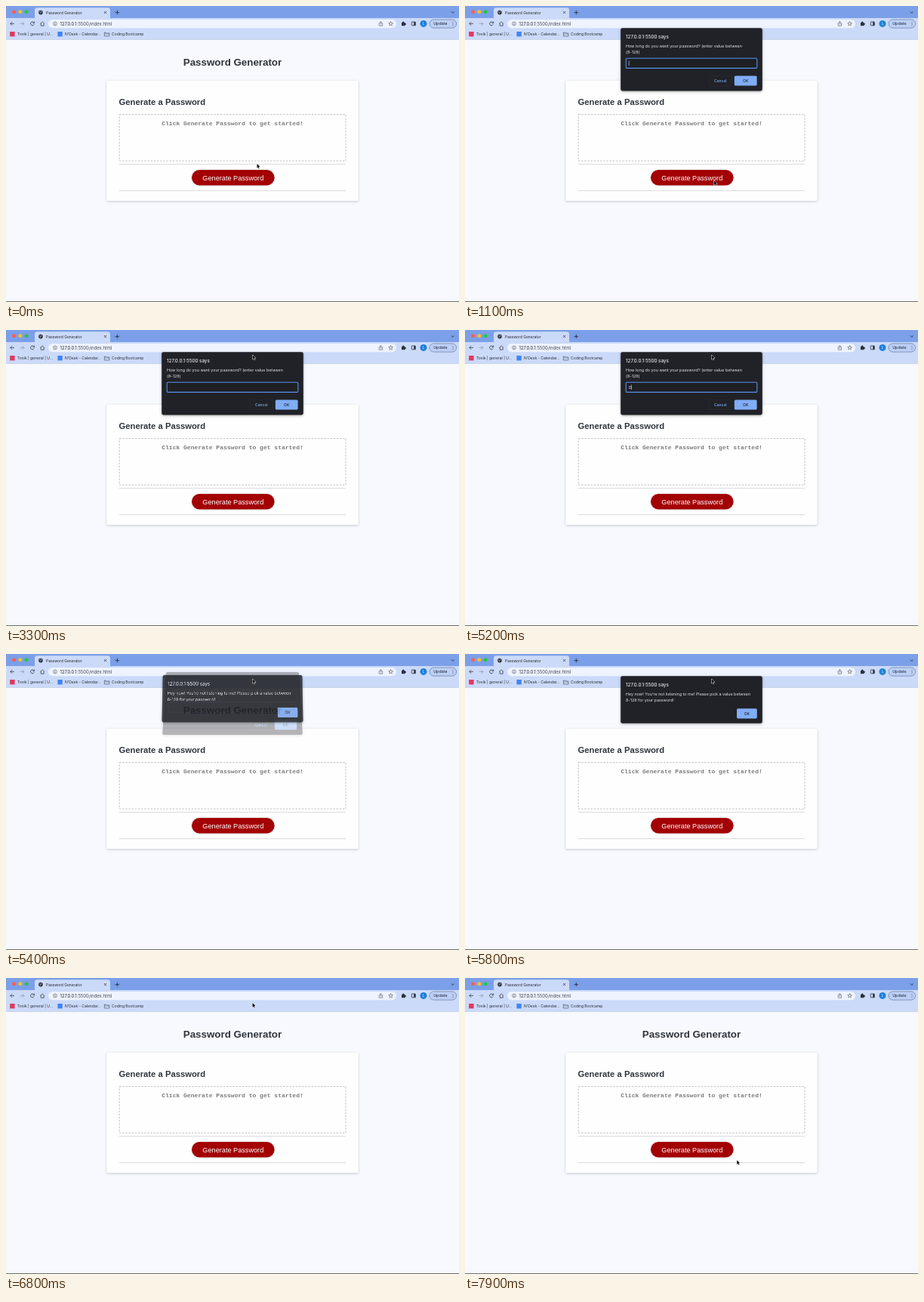
Animation of 600 by 392 pixels, one loop 8000 ms. Source, as an HTML page with a canvas:

```html
<!DOCTYPE html>
<html lang="en">
<head>
<meta charset="utf-8">
<title>Password Generator</title>
<style>
html, body { margin: 0; width: 100%; height: 100%; overflow: hidden; background: #f7f9fe; }
canvas { display: block; width: 600px; height: 392px; }
</style>
</head>
<body>
<canvas id="stage"></canvas>
<script>
const W = 600, H = 392, LOOP = 8000, STEP = 100;
const UI = 'Inter, "Noto Sans", sans-serif';
const SANS = '"Liberation Sans", Arial, sans-serif';
const MONO = '"Liberation Mono", "Courier New", monospace';
const INK = '#2f343c';
const dpr = window.devicePixelRatio || 1;
const K = 2 * dpr;

function makeCanvas(el, w, h, scale) {
  el.width = w * scale;
  el.height = h * scale;
  const c = el.getContext('2d');
  c.scale(scale, scale);
  return c;
}

const main = makeCanvas(document.getElementById('stage'), W, H, dpr);
const layerEl = document.createElement('canvas');
const layer = makeCanvas(layerEl, W, 130, K);
let g = main;

// ---- drawing helpers ----
function rect(x, y, w, h, fill) {
  g.fillStyle = fill;
  g.fillRect(x, y, w, h);
}

function roundPath(x, y, w, h, r) {
  g.beginPath();
  g.roundRect(x, y, w, h, r);
}

function box(x, y, w, h, r, fill) {
  roundPath(x, y, w, h, r);
  g.fillStyle = fill;
  g.fill();
}

function frame(x, y, w, h, r, color, width) {
  roundPath(x, y, w, h, r);
  g.strokeStyle = color;
  g.lineWidth = width;
  g.stroke();
}

function dot(x, y, r, fill) {
  g.beginPath();
  g.arc(x, y, r, 0, Math.PI * 2);
  g.fillStyle = fill;
  g.fill();
}

function ring(x, y, r, color, width, from = 0, to = Math.PI * 2) {
  g.beginPath();
  g.arc(x, y, r, from, to);
  g.strokeStyle = color;
  g.lineWidth = width;
  g.stroke();
}

function line(points, color, width) {
  g.beginPath();
  points.forEach(([x, y], i) => i ? g.lineTo(x, y) : g.moveTo(x, y));
  g.strokeStyle = color;
  g.lineWidth = width;
  g.stroke();
}

function text(str, x, y, font, fill, align = 'left') {
  g.font = font;
  g.fillStyle = fill;
  g.textAlign = align;
  g.textBaseline = 'alphabetic';
  g.fillText(str, x, y);
}

function shadow(color, blur, dy) {
  g.shadowColor = color;
  g.shadowBlur = blur * (g === layer ? K : dpr);
  g.shadowOffsetY = dy * (g === layer ? K : dpr);
}

const noShadow = () => shadow('transparent', 0, 0);

// ---- browser window ----
function drawTabs() {
  rect(0, 0, W, 17, '#7b9fe8');
  ['#fe5f57', '#febc2e', '#28c840'].forEach((c, i) => dot(10.6 + i * 8.2, 7.7, 2.5, c));
  box(38, 2.2, 100, 16, [3.4, 3.4, 0, 0], '#cbdaf8');
  dot(46, 8.6, 2.8, '#24272c');
  line([[44.2, 7.6], [46, 8.5], [45.5, 10.2]], '#cbdaf8', .7);
  line([[46.6, 6.4], [47.2, 7.8], [48.2, 8.6]], '#cbdaf8', .7);
  text('Password Generator', 53, 10.5, '4.95px ' + UI, '#22262d');
  line([[129.9, 6.9], [133.1, 10.1]], '#333', .75);
  line([[133.1, 6.9], [129.9, 10.1]], '#333', .75);
  line([[144.6, 8.6], [150, 8.6]], '#20242c', .8);
  line([[147.3, 5.9], [147.3, 11.3]], '#20242c', .8);
  line([[589.8, 7.5], [591.7, 9.4], [593.6, 7.5]], '#20242c', .8);
}

function drawNav() {
  const dark = '#3b404a', pale = '#8f9bb3';
  line([[11, 23.4], [5.8, 23.4]], dark, .8);
  line([[8.3, 20.9], [5.8, 23.4], [8.3, 25.9]], dark, .8);
  line([[18.8, 23.4], [24, 23.4]], pale, .8);
  line([[21.5, 20.9], [24, 23.4], [21.5, 25.9]], pale, .8);
  ring(35, 23.4, 2.4, dark, .85, .4, 5.6);
  line([[37.6, 20.6], [37.6, 22.6], [35.6, 22.6]], dark, .9);
  line([[45.4, 23.6], [48.2, 20.8], [51, 23.6]], dark, .8);
  line([[46.3, 23], [46.3, 26.2], [50.1, 26.2], [50.1, 23]], dark, .8);
}

function drawAddress() {
  box(56, 17.9, 461, 11.3, 5.65, '#eef3fd');
  ring(65, 23.4, 2.4, '#4a4f59', .6);
  rect(64.65, 23, .7, 1.8, '#4a4f59');
  rect(64.65, 21.8, .7, .7, '#4a4f59');
  text('127.0.0.1', 71.5, 25.5, '5.85px ' + UI, '#22262d');
  const x = 71.5 + g.measureText('127.0.0.1').width;
  text(':5500/index.html', x, 25.5, '5.85px ' + UI, '#474d58');

  line([[495.4, 22.6], [494.2, 22.6], [494.2, 26.2], [498.6, 26.2], [498.6, 22.6], [497.4, 22.6]], '#4a4f59', .6);
  line([[496.4, 24.6], [496.4, 20.5]], '#4a4f59', .6);
  line([[495.1, 21.7], [496.4, 20.4], [497.7, 21.7]], '#4a4f59', .6);

  g.beginPath();
  for (let i = 0; i < 10; i++) {
    const a = -Math.PI / 2 + i * Math.PI / 5, r = i % 2 ? 1.3 : 3;
    g.lineTo(509.6 + r * Math.cos(a), 23.5 + r * Math.sin(a));
  }
  g.closePath();
  g.strokeStyle = '#4a4f59';
  g.lineWidth = .6;
  g.stroke();
}

function drawTools() {
  const dark = '#2d323b';
  rect(524, 21.8, 4.6, 4.4, dark);
  dot(526.2, 21.5, 1.1, dark);
  dot(528.8, 23.9, 1.1, dark);
  frame(537.3, 21, 5, 4.8, .5, dark, .8);
  rect(540.2, 21, 2.1, 4.8, dark);
  dot(553, 23.4, 4.5, '#1e80dc');
  text('L', 553, 25.1, '4.6px ' + UI, '#fff', 'center');
  box(561, 17.9, 35.6, 11.2, 5.6, '#bdcff5');
  frame(561, 17.9, 35.6, 11.2, 5.6, '#65789f', .7);
  text('Update', 566.2, 25.4, '500 5.3px ' + UI, '#2d3850');
  [21.4, 23.4, 25.4].forEach(y => dot(592, y, .5, '#3b4660'));
}

function drawBookmarks() {
  const font = '5px ' + UI, ink = '#252a33';
  rect(5.2, 34, 6.4, 6.4, '#e0385f');
  text('Tovik | general | U...', 15, 38.7, font, ink);
  rect(68.4, 34, 6.4, 6.4, '#4285f4');
  text("N'Desk - Calendar...", 78, 38.7, font, ink);
  line([[130.3, 35.2], [132.6, 35.2], [133.4, 36], [136.9, 36], [136.9, 39.9], [130.3, 39.9], [130.3, 34.9]], '#505866', .7);
  line([[130.3, 37], [136.9, 37]], '#505866', .5);
  text('Coding Bootcamp', 140, 38.7, font, ink);
}

function drawBrowser() {
  drawTabs();
  rect(0, 16, W, 28.4, '#cbdaf8');
  drawNav();
  drawAddress();
  drawTools();
  drawBookmarks();
  rect(0, 44, W, .6, '#b9c6e0');
}

// ---- page ----
function drawPage() {
  rect(0, 0, W, H, '#f7f9fe');
  text('Password Generator', 300, 78.5, 'bold 13.33px ' + SANS, INK, 'center');

  shadow('rgba(0,0,0,.2)', 3.6, .9);
  box(133.3, 99, 333.4, 159, 2.1, '#fefeff');
  noShadow();
  text('Generate a Password', 149.6, 131.4, 'bold 11.25px ' + SANS, INK);

  g.setLineDash([2.5, 1.67]);
  frame(150.2, 143.7, 299.8, 61.4, 0, '#b9b9bc', .9);
  g.setLineDash([]);
  text('Click Generate Password to get started!', 300, 157.9, 'bold 8.03px ' + MONO, '#7b7b7d', 'center');

  rect(150, 209.3, 300, .8, '#d2d3d6');
  rect(150, 244.3, 300, .8, '#d2d3d6');
  shadow('rgba(0,0,0,.2)', 2.5, .4);
  box(246, 217, 109.6, 20.6, 10.3, '#a30104');
  noShadow();
  text('Generate Password', 300.8, 230.5, '9.17px ' + SANS, '#fff', 'center');
  rect(0, 391, W, 1, '#6d6e72');
}

// ---- dialogs ----
function dialogBase(h, lines) {
  shadow('rgba(0,0,0,.35)', 3.5, 1);
  box(206.2, 29.2, 187.6, h, 2.4, '#212227');
  noShadow();
  text('127.0.0.1:5500 says', 213, 43.2, '500 6.2px ' + UI, '#e6e8ec');
  lines.forEach((s, i) => text(s, 213, 55 + i * 8.4, '5.38px ' + UI, '#e3e5e9'));
}

function okButton(x, y, w) {
  box(x, y, w, 13.2, 1.7, '#80adf6');
  text('OK', x + w / 2, y + 8.4, '500 5px ' + UI, '#202228', 'center');
}

function drawPrompt(value, caret) {
  dialogBase(83.2, ['How long do you want your password? (enter value between', '(8-128)']);
  box(213.2, 69.2, 173.6, 13.2, 1.2, '#1f2024');
  frame(213.2, 69.2, 173.6, 13.2, 1.2, '#5b91ea', 1.1);
  text(value, 216.8, 77.7, '5.4px ' + UI, '#e8eaed');
  if (caret) rect(216.8 + g.measureText(value).width, 72.6, .6, 6.4, '#e8eaed');
  frame(323.6, 92.6, 29.4, 12.8, 1.7, '#2f3239', .5);
  text('Cancel', 338.3, 100.9, '500 5px ' + UI, '#82aef6', 'center');
  okButton(356.8, 92.4, 29.8);
}

function drawAlert() {
  dialogBase(62.6, ["Hey now! You're not listening to me! Please pick a value between", '8-128 for your password!']);
  okButton(360, 72.2, 26.8);
}

// Fades a dialog while it lifts and its top edge narrows; u runs 0 (open) to 1 (gone).
function showDialog(draw, h, u) {
  if (u >= 1) return;
  if (u <= 0) return draw();
  layer.clearRect(0, 0, W, 130);
  g = layer;
  draw();
  g = main;
  const x = 202, w = 196, lift = 8 * u;
  const top = 29.2 - lift;
  g.globalAlpha = 1 - u;
  for (let y = Math.floor(top) - 3; y < top + h + 4; y++) {
    const f = (y - top) / h;
    const inset = u * (9 - 7.5 * f);
    g.drawImage(layerEl, x * K, (y + lift) * K, w * K, K, x + inset, y, w - 2 * inset, 1);
  }
  g.globalAlpha = 1;
}

// ---- pointer ----
const track = [
  [0, 332.5, 209], [200, 332.5, 209], [600, 330, 231.5], [1700, 330, 231.5],
  [2700, 326.5, 33], [6800, 326.5, 33], [7700, 360.2, 241.2], [LOOP, 360.2, 241.2]
];

function pointerAt(t) {
  const i = track.findIndex(p => p[0] > t);
  const [t0, x0, y0] = track[i - 1], [t1, x1, y1] = track[i];
  const p = (t - t0) / (t1 - t0), e = p * p * (3 - 2 * p);
  return [x0 + (x1 - x0) * e, y0 + (y1 - y0) * e];
}

function drawPointer(x, y) {
  g.save();
  g.translate(x, y);
  g.beginPath();
  [[0, 0], [0, 5.7], [1.3, 4.5], [2.2, 6.5], [3.1, 6.1], [2.2, 4.1], [4, 4.1]].forEach(p => g.lineTo(...p));
  g.closePath();
  g.lineJoin = 'round';
  g.strokeStyle = '#fff';
  g.lineWidth = 1;
  g.stroke();
  g.fillStyle = '#0b0b0c';
  g.fill();
  g.restore();
}

// ---- timeline ----
const ramp = (t, a, b) => Math.min(1, Math.max(0, (t - a) / (b - a)));
const OPEN = 800, TYPED = 4800, SUBMIT = 5200, DISMISS = 6100;

function render(t) {
  drawPage();
  drawBrowser();
  const typed = t >= TYPED;
  const caret = (t - (typed ? TYPED : OPEN)) % 1000 < 500;
  const promptGone = t < 3000 ? 1 - ramp(t, OPEN - 100, OPEN + 100) : ramp(t, SUBMIT, SUBMIT + 300);
  const alertGone = t < 5800 ? 1 - ramp(t, 5200, 5440) : ramp(t, DISMISS, DISMISS + 300);
  showDialog(() => drawPrompt(typed ? '0' : '', caret), 83.2, promptGone);
  showDialog(drawAlert, 62.6, alertGone);
  drawPointer(...pointerAt(t));
}

function tick() {
  const t = performance.now() % LOOP;
  render(Math.floor(t / STEP) * STEP);
  requestAnimationFrame(tick);
}
tick();
</script>
</body>
</html>
```
